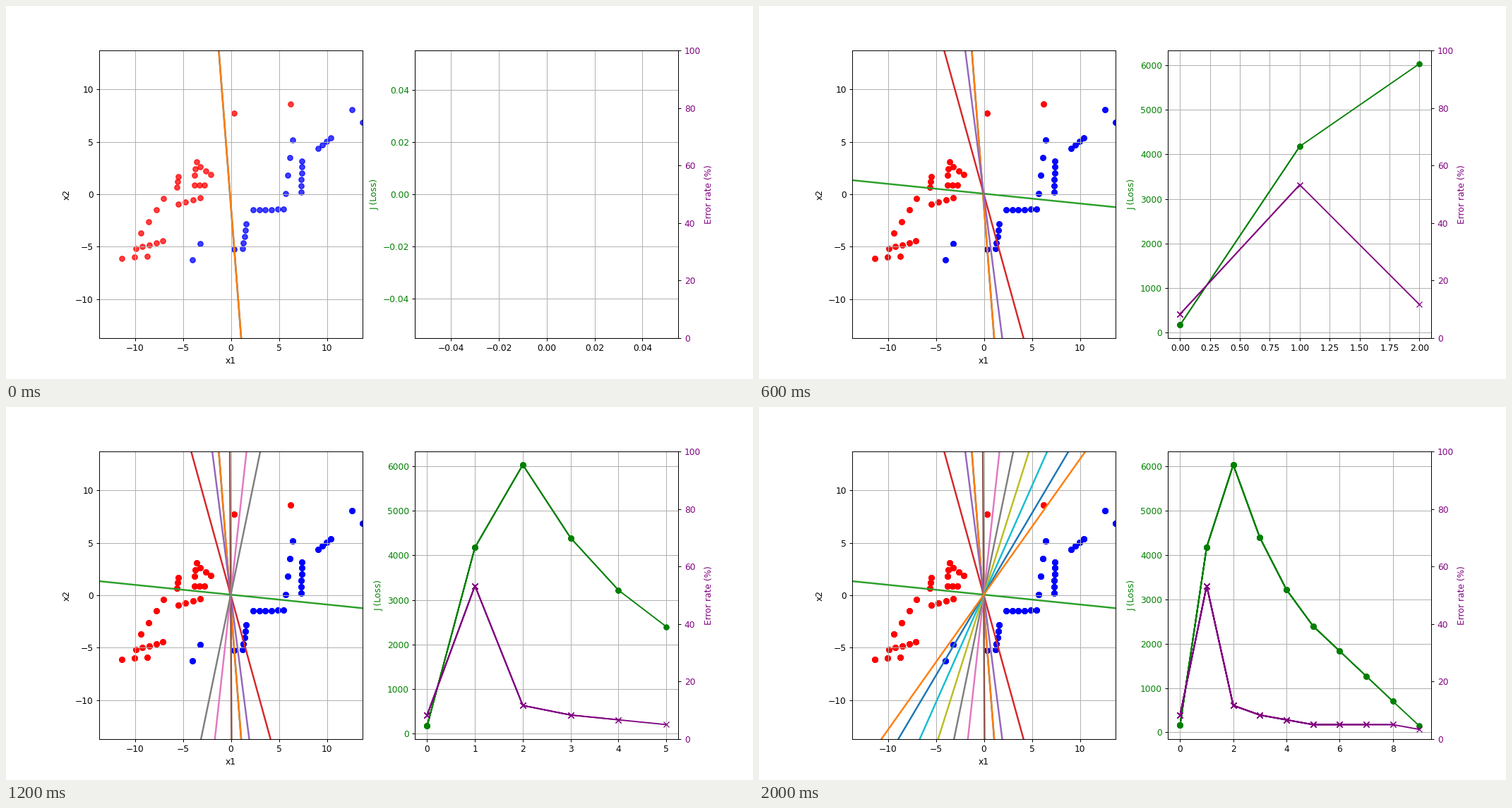
Recreate the animation shown at these times as a matplotlib script. Size 1058 by 529 pixels, loop 2.2 s.

```python
import matplotlib.pyplot as plt
import numpy as np
from matplotlib.animation import FuncAnimation

WIDTH_PX = 1058
WIDTH_IN, HEIGHT_IN = 12, 6
LIMIT = 13.7
STEPS = 11


def dots(rows, outliers):
    """Evenly spaced dots along each (start, end, count) row, plus single ones."""
    return np.vstack([np.linspace(*row) for row in rows] + [outliers])


RED = dots(
    [
        ((-11.4, -6.1), (-8.7, -5.9), 3),
        ((-9.9, -5.2), (-7.1, -4.4), 5),
        ((-9.4, -3.7), (-7.0, -0.4), 4),
        ((-5.5, -0.9), (-3.2, -0.3), 4),
        ((-5.6, 0.7), (-5.5, 1.7), 3),
        ((-3.8, 0.9), (-2.8, 0.9), 3),
        ((-3.8, 1.8), (-3.6, 3.1), 3),
        ((-3.2, 2.6), (-2.1, 1.9), 3),
    ],
    [(0.36, 7.75), (6.24, 8.59)],
)
BLUE = dots(
    [
        ((1.2, -5.2), (1.6, -2.8), 5),
        ((2.3, -1.5), (5.5, -1.4), 6),
        ((5.7, 0.1), (6.4, 5.2), 4),
        ((7.3, 0.2), (7.4, 3.2), 6),
        ((9.1, 4.4), (10.4, 5.4), 4),
        ((12.6, 8.1), (13.7, 6.9), 2),
    ],
    [(-4.05, -6.24), (-3.24, -4.69), (0.32, -5.27)],
)


def train(weights, steps):
    """Batch perceptron: weights, loss and error rate (%) at every step."""
    samples = np.vstack([RED, BLUE])
    labels = np.repeat([-1, 1], [len(RED), len(BLUE)])
    signed = np.column_stack([samples, np.ones(len(samples))]) * labels[:, None]
    history = []
    for _ in range(steps):
        margins = signed @ weights
        wrong = margins < 0
        history.append((weights, -margins[wrong].sum(), 100 * wrong.mean()))
        weights = weights + signed[wrong].sum(axis=0)
    return zip(*history)


WEIGHTS, LOSS, ERRORS = train(np.array([10.6, 0.9, 1.05]), STEPS)

fig = plt.figure(figsize=(WIDTH_IN, HEIGHT_IN), dpi=WIDTH_PX / WIDTH_IN)


def draw_samples(ax):
    ax.scatter(*RED.T, color="red", alpha=0.5)
    ax.scatter(*BLUE.T, color="blue", alpha=0.5)


def draw_boundary(ax, step):
    wx, wy, bias = WEIGHTS[step]
    y = np.array([2 * LIMIT, -2 * LIMIT])
    ax.plot(-(wy * y + bias) / wx, y, linewidth=2)


def draw_history(loss_ax, error_ax, count):
    epochs = range(count)
    loss_ax.plot(epochs, LOSS[:count], color="green", marker="o")
    error_ax.plot(epochs, ERRORS[:count], color="purple", marker="x")


def style_y(ax, label, color):
    ax.set_ylabel(label, color=color)
    ax.tick_params(axis="y", labelcolor=color)


def draw(frame):
    fig.clear()
    plane, loss_ax = fig.subplots(1, 2)
    error_ax = loss_ax.twinx()

    # Every step paints over the earlier ones; the first is painted twice
    for step in [0, *range(frame + 1)]:
        draw_samples(plane)
        draw_boundary(plane, step)
        draw_history(loss_ax, error_ax, step)

    plane.set(xlim=(-LIMIT, LIMIT), ylim=(-LIMIT, LIMIT), xlabel="x1", ylabel="x2")
    plane.grid(True)
    loss_ax.grid(True)
    style_y(loss_ax, "J (Loss)", "green")
    style_y(error_ax, "Error rate (%)", "purple")
    error_ax.set_ylim(0, 100)


anim = FuncAnimation(fig, draw, frames=STEPS, interval=200, repeat=True, repeat_delay=0)
plt.show()
```
